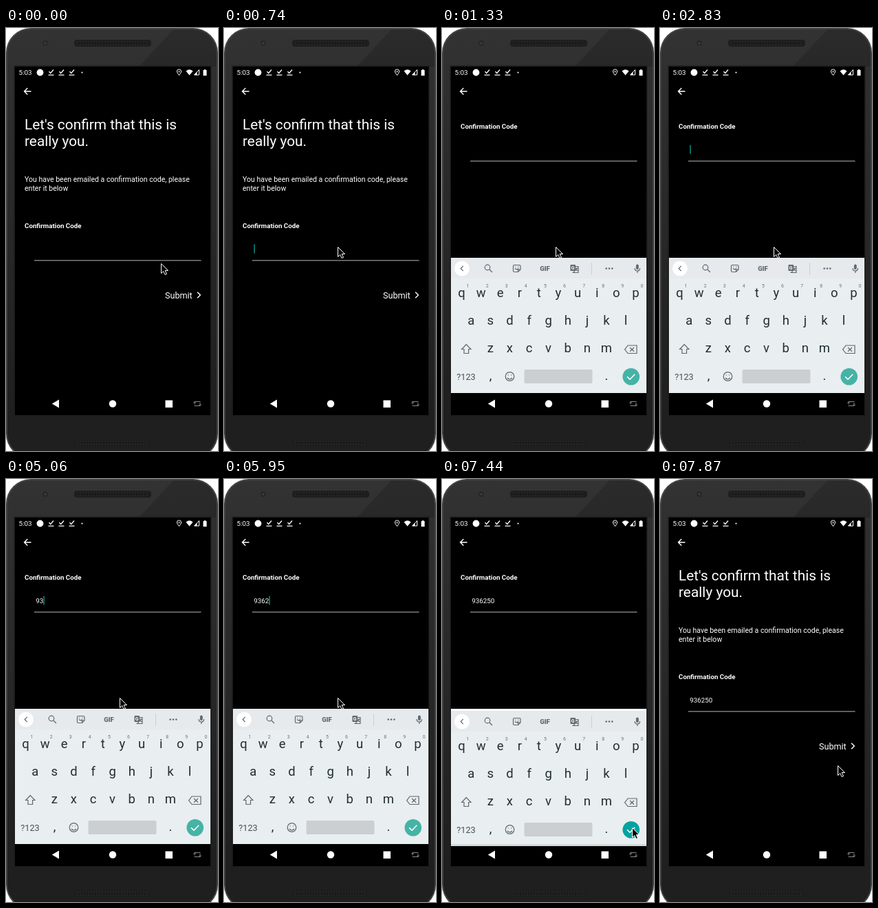
These frames come from a looping animation (308 px wide and 613 px high, 8000 ms). An HTML page:

```html
<!DOCTYPE html>
<html lang="en">
<head>
<meta charset="utf-8">
<title>Confirmation code</title>
<style>
  html, body { margin: 0; height: 100%; overflow: hidden; background: #fff; }
  svg { display: block; width: 100vw; height: 100vh; font-family: Roboto, sans-serif; }
  .line { fill: none; stroke: #fff; }
  .icon { fill: none; stroke: #5f686e; stroke-width: 1.2; }
  .key { font-size: 18.5px; fill: #202e35; text-anchor: middle; }
  .hint { font-size: 7px; fill: #6c757a; text-anchor: middle; }
</style>
</head>
<body>
<svg viewBox="0 0 308 613">
  <defs>
    <linearGradient id="shell" x2="0" y2="1">
      <stop stop-color="#333"/><stop offset=".12" stop-color="#2f2f2f"/><stop offset=".9" stop-color="#1f1f1f"/>
    </linearGradient>
    <clipPath id="content"><rect x="13" y="108" width="284" height="421"/></clipPath>
    <clipPath id="panel"><rect x="13" y="333" width="284" height="206"/></clipPath>
    <clipPath id="front"><rect x="2" y="2" width="304" height="620" rx="34"/></clipPath>
    <g id="speaker">
      <rect x="99" y="-5" width="112" height="10" rx="4" fill="#1e1e1e"/>
      <path d="M103 -2H207M103 2H207" stroke="#2a2a2a" stroke-dasharray="2 2"/>
      <path d="M105 0H205" stroke="#171717" stroke-width="2" stroke-dasharray="2 2"/>
    </g>
    <path id="saved" d="M-3 -1.5L-.8 1L3.5 -4M-4 3.7H4" class="line" stroke-width="1.3"/>
  </defs>

  <!-- phone -->
  <rect width="308" height="624" rx="36" fill="#444"/>
  <g clip-path="url(#front)">
    <rect width="308" height="624" fill="url(#shell)"/>
    <path d="M245 0H308V56H193Z" opacity=".16"/>
  </g>
  <rect x="11.5" y="54.5" width="287" height="508" fill="#1d1d1d"/>
  <circle cx="57" cy="22" r="4" fill="#282828"/><circle cx="57" cy="22" r="1.6" fill="#3c4047"/>
  <use href="#speaker" y="22"/><use href="#speaker" y="601"/>
  <rect x="13" y="56" width="284" height="505"/>

  <!-- status bar -->
  <g fill="#fff">
    <text x="18.5" y="68" font-size="9.8">5:03</text>
    <circle cx="49.5" cy="64.5" r="4.9"/><circle cx="110.5" cy="64.5" r="1.1"/>
    <use href="#saved" x="65.5" y="64.5"/><use href="#saved" x="80.5" y="64.5"/><use href="#saved" x="95.5" y="64.5"/>
    <path d="M251.5 68.5Q248.4 64.7 248.4 63A3.1 3.1 0 0 1 254.6 63Q254.6 64.7 251.5 68.5Z" class="line"/>
    <circle cx="251.5" cy="63.2" r="1"/>
    <path d="M261.5 62.5Q266.5 58 271.5 62.5L266.5 68.5Z"/>
    <path d="M273.5 68H280.5V60.5Z" class="line"/><path d="M273.5 68H277.5V63.5Z"/>
    <path d="M286.5 61H288V60H290V61H291.5V69H286.5Z"/>
  </g>
  <path d="M36.5 91.8H27M31.3 87L26.6 91.8L31.3 96.6" class="line" stroke-width="1.4"/>

  <!-- form -->
  <g clip-path="url(#content)"><g id="form" fill="#fff">
    <g id="extras">
      <g font-size="20.85"><text x="27" y="147">Let's confirm that this is</text><text x="27" y="171">really you.</text></g>
      <g font-size="10.55"><text x="27" y="223">You have been emailed a confirmation code, please</text><text x="27" y="235.5">enter it below</text></g>
      <text x="231" y="391.7" font-size="12.6">Submit</text>
      <path d="M278 382.7L282.3 387L278 391.3" class="line" stroke-width="1.4"/>
    </g>
    <text x="27" y="290" font-size="9.75" font-weight="700">Confirmation Code</text>
    <text id="code" x="43.3" y="324.3" font-size="9.8"></text>
    <rect id="caret" y="313.5" width="1.4" height="13" fill="#0a9a8d"/>
    <path d="M41 336.9H283.5" stroke="#bbb"/>
  </g></g>

  <!-- navigation bar -->
  <rect x="13" y="529" width="284" height="32"/>
  <g fill="#fff">
    <path d="M66.8 544.5L77 538.5V550.5Z"/><circle cx="155" cy="544.5" r="5.2"/>
    <rect x="231.5" y="539.5" width="10.5" height="10.5"/>
    <path d="M274 545.5V541.5H282.5M272.3 543.5L274 541.5L275.7 543.5M282 543V547.5H273.5M280.3 545.5L282 547.5L283.7 545.5" class="line" style="stroke:#888"/>
  </g>

  <!-- keyboard -->
  <g id="keyboard" clip-path="url(#panel)">
    <rect id="backing" x="13" y="333" width="284" fill="#fff"/>
    <g id="keys">
      <rect x="13" y="333" width="284" height="196" fill="#e9eef0"/>
      <rect x="13" y="333" width="284" height="30" fill="#e6eaed"/>
      <circle cx="29" cy="348.5" r="10.8" fill="#fff"/>
      <g class="icon">
        <path d="M30.8 344.8L27.2 348.5L30.8 352.2"/>
        <circle cx="66" cy="347" r="3.8"/><path d="M69 350L73 354"/>
        <path d="M105 343.5H112.5Q114 343.5 114 345V350L110.5 353.5H105Q103.5 353.5 103.5 352V345Q103.5 343.5 105 343.5ZM110.5 353.5V350H114M106 348.5Q108.5 351 111 348.5M106 346H107.5M110 346H111.5"/>
        <path d="M194 345.5H198V354.5H190.5L193 352.5M193.5 348H197.5M196.5 348L193.5 351.5M194.5 349.5L197 352"/>
        <path d="M217.5 340V358" stroke="#cbd0d3" stroke-width="1"/>
        <path d="M280 348Q280 352 283.8 352T287.5 348M283.8 352V355"/>
      </g>
      <rect x="186.5" y="343" width="7.5" height="9" rx="1" fill="#5f686e"/>
      <text x="190.2" y="350" font-size="7" font-weight="700" fill="#fff" text-anchor="middle">G</text>
      <text x="149.5" y="352" font-size="9.6" font-weight="900" fill="#5f686e" text-anchor="middle">GIF</text>
      <g fill="#5f686e">
        <circle cx="238.7" cy="348.5" r="1.3"/><circle cx="243" cy="348.5" r="1.3"/><circle cx="247.3" cy="348.5" r="1.3"/>
        <rect x="281.9" y="342.5" width="3.8" height="7.5" rx="1.9"/>
      </g>
      <g id="letters"></g>
      <g class="icon">
        <path d="M35.3 458.5L28.7 465.5H32V471.5H38.6V465.5H42Z"/>
        <path d="M265.5 465.8L270 460H283V471.5H270ZM273 463L279 468.7M279 463L273 468.7"/>
        <circle cx="98.5" cy="505" r="6.3"/><path d="M95 507Q98.5 511 102 507M95.7 503H97M100 503H101.3"/>
      </g>
      <text x="35" y="509.7" font-size="12.7" fill="#455158" text-anchor="middle">?123</text>
      <rect x="119.5" y="495" width="99" height="20" rx="2" fill="#cbcfd2"/>
      <circle id="enter" cx="274.7" cy="505.3" r="12.3"/>
      <path d="M269 505.3L273 509.2L280.2 501.8" class="line" stroke-width="1.6"/>
    </g>
    <rect id="scrim" x="13" y="529" width="284"/>
  </g>

  <path id="mouse" d="M.5 .5V14.5L3.7 11.5L6.1 16.5L8.5 15.5L6.2 10.5H10.5Z" stroke="#fff" stroke-linejoin="round"/>
</svg>
<script>
const $ = id => document.getElementById(id);
const set = (id, attrs) => { for (const k in attrs) $(id).setAttribute(k, attrs[k]); };
const label = (cls, x, y, s) => `<text class="${cls}" x="${x}" y="${y}">${s}</text>`;

const PITCH = 28.1;
const rows = [['qwertyuiop', 28.5, 389.5], ['asdfghjkl', 42.3, 429.8], ['zxcvbnm', 70.3, 470.4]];
let letters = label('key', 70.5, 510, ',') + label('key', 239, 510, '.');
rows.forEach(([chars, x0, y], r) => [...chars].forEach((c, i) => {
  letters += label('key', x0 + i * PITCH, y, c);
  if (!r) letters += label('hint', x0 + 9 + i * PITCH, 376, (i + 1) % 10);
}));
$('letters').innerHTML = letters;

const LOOP = 8000;
const typed = [4620, 5060, 5360, 5950, 6250, 6390];
const blinks = [740, 1330, 1780, 2230, 2830, 3280, 3730, 4320, 4620, 6840];
const moves = [ // start, interval, steps, x, y
  [150, 150, 4, 165, 317],
  [6690, 150, 4, 276, 505],
  [7580, 145, 3, 258, 415]
];
const passed = (times, t) => times.filter(s => t >= s).length;

function mouseAt(t) {
  let x = 225, y = 341;
  for (const [start, gap, n, tx, ty] of moves) {
    if (t < start) break;
    const p = Math.min(1, (Math.floor((t - start) / gap) + 1) / n);
    x += (tx - x) * p;
    y += (ty - y) * p;
  }
  return [x, y];
}

function draw(t) {
  const count = passed(typed, t);
  const open = t >= 890 && t < 7580;
  const rising = t < 1040, falling = t >= 7440;
  const scrolled = open && !rising;
  const drop = rising ? 10 : falling ? 3 : 0;

  set('form', { transform: `translate(0 ${scrolled ? -144 : open ? -1 : 0})` });
  set('extras', { visibility: scrolled ? 'hidden' : 'visible' });
  $('code').textContent = '936250'.slice(0, count);
  set('caret', { x: 43.4 + 5.5 * count, visibility: passed(blinks, t) % 2 ? 'visible' : 'hidden' });

  set('keyboard', { visibility: open ? 'visible' : 'hidden' });
  set('backing', { height: 196 + drop });
  set('keys', { transform: `translate(0 ${drop})`, opacity: rising ? .82 : 1 });
  set('scrim', { height: drop, fill: rising ? '#b9bdc0' : '#d5d9db' });
  set('enter', { fill: t >= 7140 ? '#00a3a0' : '#45b3a5' });
  set('mouse', { transform: `translate(${mouseAt(t)})` });
}

const began = performance.now();
(function tick() {
  draw((performance.now() - began) % LOOP);
  requestAnimationFrame(tick);
})();
</script>
</body>
</html>
```
